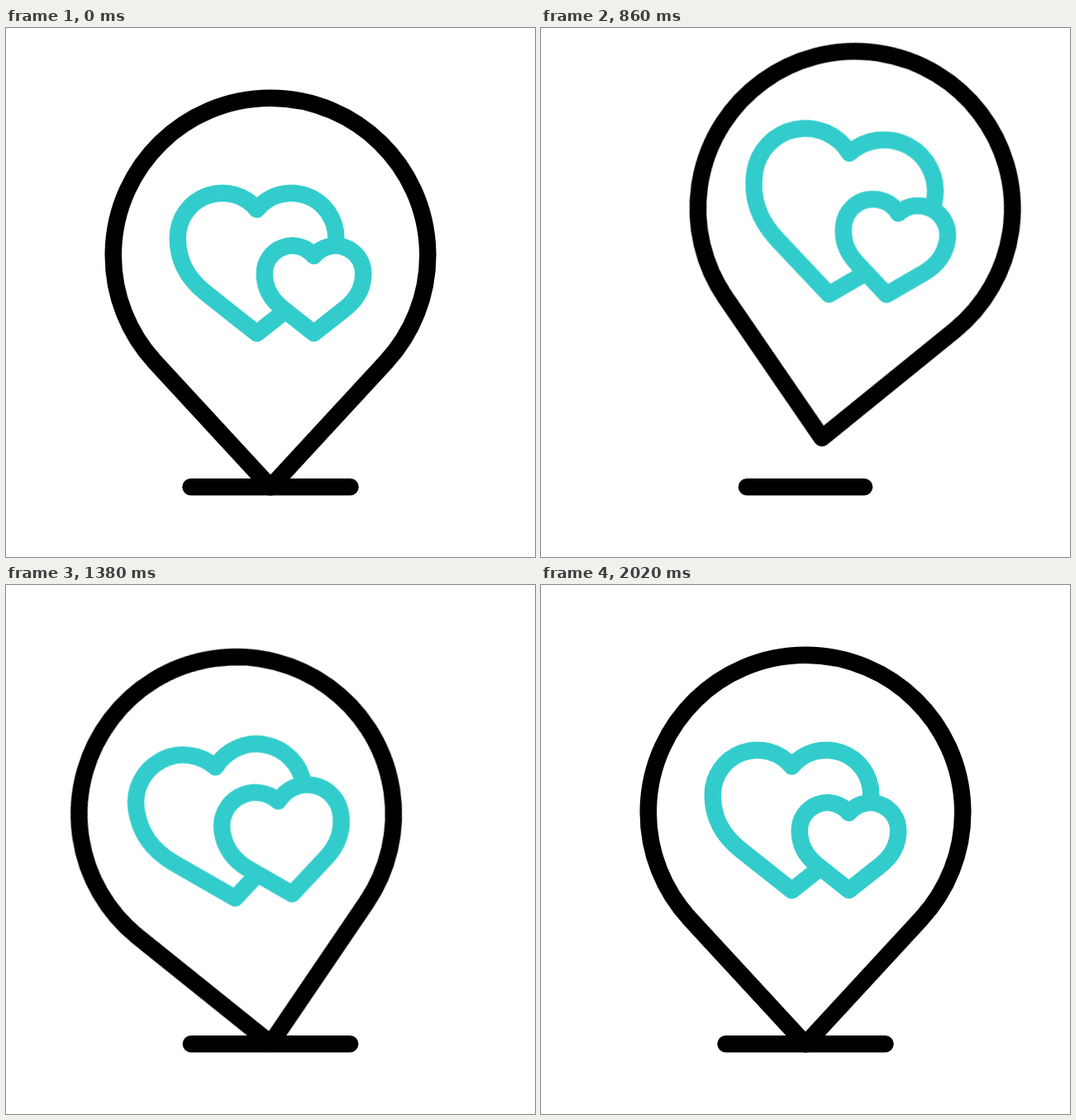
These frames come from a looping animation (640x640 px, 2.4 s). An HTML page:

```html
<!DOCTYPE html>
<html lang="en">
<head>
<meta charset="utf-8">
<title>Love location pin</title>
<style>
  @property --s { syntax: "<number>"; inherits: false; initial-value: 1; }
  @property --a { syntax: "<length>"; inherits: false; initial-value: 0px; }
  @property --b { syntax: "<length>"; inherits: false; initial-value: 0px; }

  html, body { margin: 0; width: 100%; height: 100%; overflow: hidden; background: #fff; }
  svg { display: block; width: 100%; height: 100%; }

  svg * {
    animation-duration: 2400ms;
    animation-iteration-count: infinite;
    animation-timing-function: cubic-bezier(.3333, 0, .6667, 1);
  }
  .ink {
    fill: none; stroke: #000; stroke-width: 20.5px;
    stroke-linecap: round; stroke-linejoin: round;
  }

  .pin { transform-origin: 320px 555.5px; animation-name: pin; }
  @keyframes pin {
    0%, 8.3333% { transform: translate(0, 0) rotate(0deg); }
    45.8333% { transform: translate(24px, -72px) rotate(10deg); }
    58.3333% { transform: translate(0, 0) rotate(-8.75deg); }
    70.8333% { transform: translate(0, 0) rotate(5.05deg); }
    83.3333%, 100% { transform: translate(0, 0) rotate(0deg); }
  }

  .ground { animation-name: ground; }
  @keyframes ground {
    0%, 8.3333%, 58.3333%, 100% { stroke-dasharray: 193px 300px; stroke-dashoffset: 0px; }
    45.8333% { stroke-dasharray: 131.4px 300px; stroke-dashoffset: -30.8px; }
  }

  /* Outline weight stays constant while the heart scales */
  .heart {
    fill: #fff; stroke: #3cc; stroke-linejoin: round;
    stroke-width: calc(20.5px / var(--s));
    transform: scale(var(--s));
  }
  .big { animation-name: big; }
  @keyframes big {
    0%, 16.6667%, 50%, 83.3333%, 100% { --s: 1; }
    33.3333%, 66.6667% { --s: 1.16; }
  }
  .small { animation-name: small; }
  @keyframes small {
    0%, 8.3333%, 41.6667%, 75%, 100% { --s: .624; }
    25%, 58.3333% { --s: .758; }
  }

  /* Each spark shows the stretch of its line from --a to --b */
  .spark {
    stroke-dasharray: calc(var(--b) - var(--a)) 300px;
    stroke-dashoffset: calc(var(--a) * -1);
    animation-name: head, tail, show;
    animation-timing-function: cubic-bezier(.3333, 0, .6667, 1), cubic-bezier(.3333, 0, .6667, 1), step-end;
  }
  @keyframes head {
    0%, 58.3333% { --b: 0px; }
    66.6667%, 100% { --b: 82px; }
  }
  @keyframes tail {
    0%, 62.5% { --a: 0px; }
    70.8333%, 100% { --a: 82px; }
  }
  @keyframes show {
    0% { opacity: 0; }
    58.5% { opacity: 1; }
    70.6% { opacity: 0; }
    100% { opacity: 0; }
  }
</style>
</head>
<body>
<svg viewBox="0 0 640 640">
  <defs>
    <path id="heart" d="M0-65.25A54 54 0 0 0-95.75-31C-95.75-3-84.5 17.5-62.5 35.2L0 84.75 62.5 35.2C84.5 17.5 95.75-3 95.75-31A54 54 0 0 0 0-65.25Z"/>
  </defs>
  <path class="ink ground" d="M223.5 555.2H416.5"/>
  <path class="ink spark" d="M432.2 497.1L484 433.4"/>
  <path class="ink spark" d="M447.8 528.7L529.4 520.9"/>
  <g class="pin">
    <path class="ink" d="M320 555.5L180.4 404.3A190.25 190.25 0 1 1 459.6 404.3Z"/>
    <g transform="translate(303.5 284.75)"><use class="heart big" href="#heart"/></g>
    <g transform="translate(372.5 316.4)"><use class="heart small" href="#heart"/></g>
  </g>
</svg>
</body>
</html>
```
